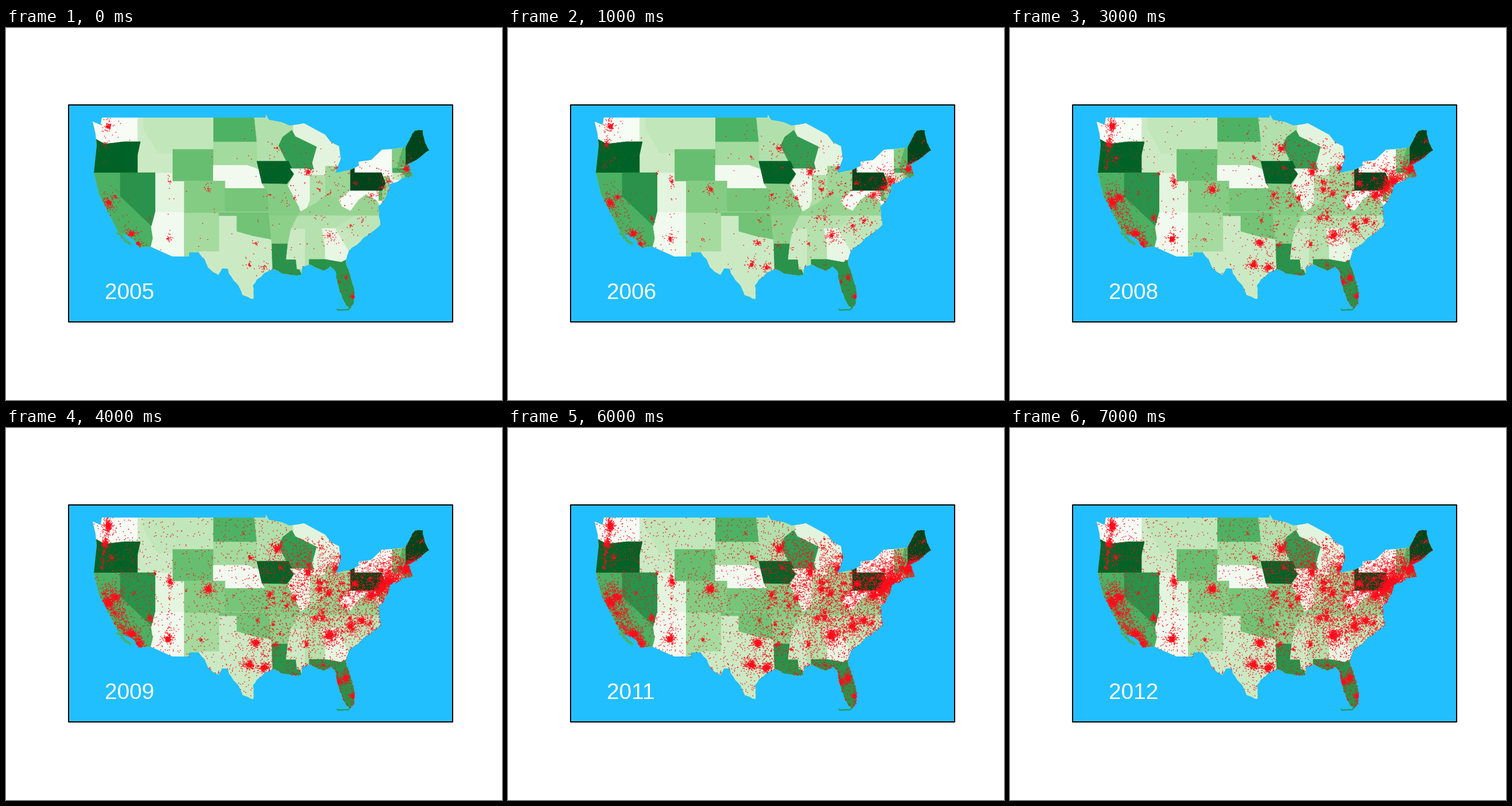
Write a matplotlib script that moves like this. It is 864x648 px and loops after 8000 ms.

```python
import numpy as np
import matplotlib.pyplot as plt
from matplotlib.animation import FuncAnimation
from matplotlib.patches import Polygon, Rectangle
from matplotlib.path import Path

W, H, DPI = 864, 648, 72
SEA, RED = "#22bffe", "#fc0d1b"
YEARS = range(2005, 2013)

rng = np.random.default_rng(11)
fig = plt.figure(figsize=(W / DPI, H / DPI), dpi=DPI, facecolor="white")
ax = fig.add_axes([0, 0, 1, 1])
ax.set_xlim(0, W)
ax.set_ylim(H, 0)
ax.axis("off")
ax.add_patch(Rectangle((109, 134), 669, 378, fc=SEA, ec="black", lw=2,
                       joinstyle="round", zorder=0))

# Key points of the coast and borders, clockwise from the northwest
NORTH = [(151, 163), (165, 169), (167, 156), (452, 156), (453, 151), (458, 160),
         (480, 164), (494, 170), (509, 168), (519, 166), (556, 186), (566, 199),
         (580, 206), (583, 228), (573, 253), (600, 247), (615, 240), (614, 233),
         (636, 230), (655, 212), (672, 211), (696, 208)]
ATLANTIC = [(696, 208), (704, 192), (712, 179), (726, 178), (730, 200), (737, 213),
            (720, 226), (700, 237), (708, 258), (697, 260), (688, 263), (668, 272),
            (667, 282), (657, 302), (648, 312), (652, 343), (622, 366), (597, 388),
            (592, 404), (602, 440), (607, 460), (606, 480), (600, 488)]
GULF = [(593, 484), (581, 458), (577, 440), (574, 424), (565, 415), (553, 423),
        (530, 412), (516, 416), (514, 430), (497, 430), (466, 420), (437, 438),
        (430, 449), (431, 472), (412, 465), (401, 444), (387, 420), (376, 419),
        (370, 430), (352, 417), (336, 391)]
PACIFIC = [(319, 391), (319, 398), (290, 398), (252, 381), (231, 382), (220, 366),
           (195, 355), (180, 325), (162, 290), (153, 252), (158, 205), (156, 184)]


def rough(pts, depth=2, amount=.05):
    """Break a coast into ragged pieces by random midpoint shifts."""
    pts = np.array(pts, float)
    for _ in range(depth):
        step = np.diff(pts, axis=0)
        normal = step[:, ::-1] * (1, -1)
        mid = pts[:-1] + step / 2 + normal * rng.normal(0, amount, (len(step), 1))
        pts = np.insert(pts, np.arange(1, len(pts)), mid, axis=0)
    return pts


nation = np.concatenate([NORTH, rough(ATLANTIC), rough(GULF), PACIFIC])
land = Path(nation)
mask = ax.add_patch(Polygon(nation, fc=plt.cm.Greens(.35), lw=0, zorder=1))


def state(shade, *xy):
    """Fill a rectangle (two corners) or polygon, trimmed to the nation."""
    if len(xy) == 4:
        x0, y0, x1, y1 = xy
        xy = x0, y0, x1, y0, x1, y1, x0, y1
    color = plt.cm.Greens(shade)
    patch = ax.add_patch(Polygon(np.reshape(xy, (-1, 2)), fc=color, ec=color,
                                 lw=.6, zorder=1))
    patch.set_clip_path(mask)


# Later states cover the overlap of earlier ones.
# West
state(.00, 145, 150, 229, 205)
state(.235, 229, 150, 290, 252)
state(.91, 140, 193, 157, 194, 172, 202, 206, 198, 234, 198, 229, 221, 229, 252, 140, 252)
state(.27, 239, 150, 361, 150, 361, 211, 290, 211, 289, 217, 264, 218, 254, 200, 240, 176)
state(.60, 140, 252, 256, 390)
state(.72, 199, 252, 260, 252, 260, 333, 256, 347, 199, 293)
state(.13, 260, 252, 310, 321)
state(.04, 260, 321, 310, 321, 310, 400, 290, 400, 252, 382, 256, 366, 253, 347, 257, 333)
state(.53, 290, 211, 361, 266)
state(.36, 310, 321, 371, 400)

# Plains
state(.59, 361, 150, 437, 198)
state(.37, 361, 198, 440, 248)
state(.035, 361, 239, 420, 239, 440, 246, 450, 279, 361, 279)
state(.455, 310, 266, 381, 321)
state(.495, 381, 279, 458, 321)
state(.235, 371, 320, 470, 320, 470, 480, 336, 480, 336, 389, 371, 389)
state(.505, 371, 321, 462, 321, 462, 368, 430, 362, 402, 354, 402, 327, 371, 327)

# Midwest
state(.32, 431, 140, 437, 198, 438, 232, 494, 232, 520, 160, 500, 140)
state(.135, 500, 160, 590, 257)
state(.68, 475, 205, 482, 190, 498, 178, 504, 189, 541, 207, 533, 235, 536, 246, 495, 245)
state(.91, 437, 232, 492, 232, 502, 254, 489, 272, 446, 271)
state(.33, 527, 256, 556, 308)
state(.39, 556, 240, 600, 300)
state(.09, 495, 245, 524, 245, 529, 258, 529, 300, 522, 318, 514, 320, 489, 280, 502, 254)
state(.455, 446, 271, 489, 272, 510, 312, 514, 327, 505, 334, 458, 327, 456, 285)

# South
state(.43, 458, 327, 508, 327, 508, 334, 491, 376, 463, 376)
state(.72, 463, 376, 491, 376, 488, 403, 505, 403, 507, 413, 520, 440, 465, 440)
state(.235, 497, 348, 522, 348, 520, 420, 507, 420, 505, 403, 488, 403, 491, 376)
state(.315, 521, 348, 556, 420)
state(.105, 550, 348, 575, 348, 600, 386, 592, 410, 556, 410, 556, 380)
state(.72, 528, 403, 556, 403, 584, 408, 592, 404, 620, 404, 620, 500, 528, 500)
state(.41, 513, 320, 540, 305, 556, 291, 580, 297, 592, 316, 580, 327, 508, 327)
state(.00, 612, 283, 658, 310)
state(.56, 649, 283, 658, 300)
state(.405, 572, 327, 592, 316, 614, 299, 624, 288, 645, 300, 652, 312, 655, 327)
state(.315, 508, 327, 608, 327, 578, 348, 497, 350)
state(.28, 608, 327, 660, 327, 660, 345, 622, 368, 600, 355, 573, 348)
state(.255, 573, 348, 600, 354, 624, 367, 598, 390)
state(.01, 580, 300, 600, 283, 634, 284, 614, 299, 600, 318, 586, 311)

# Northeast
state(.005, 600, 205, 690, 275)
state(.415, 655, 258, 668, 300)
state(1.0, 600, 240, 607, 240, 607, 252, 654, 252, 661, 271, 655, 283, 600, 283)
state(.26, 673, 252, 688, 264)
state(.43, 688, 252, 698, 265)
state(.62, 673, 243, 715, 236, 715, 270, 697, 270, 694, 252, 673, 252)
state(.46, 672, 205, 692, 243)
state(.58, 692, 205, 697, 205, 699, 239, 682, 243)
state(1.0, 696, 170, 745, 237)

# Offshore islands
for ends, width, shade in [([(195, 358), (216, 376)], 4, .60),
                           ([(577, 490), (600, 487)], 2, .72)]:
    ax.plot(*rough(ends, 4, .15).T, color=plt.cm.Greens(shade), lw=width, zorder=1)

# Cities from largest to smallest; the first group starts early.
EARLY = [(178, 304), (697, 245), (218, 358), (178, 171), (526, 250), (230, 375),
         (604, 467)]
LATER = [(667, 267), (655, 278), (636, 291), (563, 361), (424, 412), (435, 374),
         (352, 280), (450, 417), (282, 367), (592, 435), (472, 209), (574, 244),
         (190, 294), (599, 344), (619, 335), (172, 202), (561, 288), (545, 281),
         (580, 442), (502, 296), (459, 290), (607, 271), (538, 331), (285, 267),
         (250, 331)]

# Share of all dots present in each year
CITY_GROWTH = np.array([0, .13, .32, .48, .78, .93, .97, 1])
RURAL_GROWTH = np.array([.012, .04, .10, .18, .66, .93, .97, 1])

dots, births = [], []


def add(p, growth):
    p = p[land.contains_points(p)]
    dots.append(p)
    births.append(np.searchsorted(growth, rng.random(len(p))))


def city(center, n, start):
    reach = rng.exponential(1, (n, 1)) + .3
    offset = rng.normal(0, 1.7 + n / 260, (n, 2)) * reach
    add(center + offset, start + (1 - start) * CITY_GROWTH)


def corridor(n, width, path):
    """Scatter dots along a polyline."""
    p = np.array(path)
    t = rng.random(n) * (len(p) - 1)
    k = np.arange(len(p))
    line = np.column_stack([np.interp(t, k, axis) for axis in p.T])
    add(line + rng.normal(0, width, (n, 2)), .03 + .97 * CITY_GROWTH)


def countryside(n=110000):
    """Random points thinned by a smooth density, away from the lakes."""
    p = rng.uniform((150, 154), (740, 490), (n, 2))
    x, y = p.T
    level = .017
    for cx, cy, sx, sy, peak in [(580, 308, 66, 55, .13), (674, 260, 26, 22, .32),
                                 (190, 312, 16, 36, .05), (435, 395, 28, 32, .03),
                                 (525, 235, 48, 28, .08)]:
        level = level + peak * np.exp(-((x - cx) / sx) ** 2 / 2 - ((y - cy) / sy) ** 2 / 2)
    lake = ((x - 537) / 6) ** 2 + ((y - 228) / 23) ** 2 < 1
    lake |= (x > 500) & (x < 560) & (y < 190)
    p = p[(rng.random(n) < level / .55) & ~lake]
    add(p, RURAL_GROWTH)
    return p


for i, spot in enumerate(EARLY):
    city(spot, int(520 * .86 ** i), .28)
for i, spot in enumerate(LATER):
    city(spot, int(500 * .945 ** i), .06)
for spot in rng.choice(countryside(), 150):
    city(spot, int(8 + rng.exponential(16)), .03)

corridor(420, 4, [LATER[2], LATER[1], LATER[0], (680, 256), EARLY[1], (712, 226)])
corridor(350, 3, ATLANTIC[5:])
corridor(200, 3, GULF[:10])
corridor(330, 4, np.array(PACIFIC[4:9]) + (7, -4))
corridor(220, 5, [(178, 270), (196, 305), (212, 345)])
corridor(190, 2, [(176, 156), EARLY[3], LATER[15], (167, 248)])
corridor(90, 2, [(284, 254), (286, 275), (283, 366)])
corridor(130, 4, [LATER[3], LATER[13], LATER[14]])

dots = np.concatenate(dots)
births = np.concatenate(births)

marks, = ax.plot([], [], "s", color=RED, ms=1.5, mew=0, zorder=2)
label = ax.text(172.4, 472, "", color="white", fontsize=38.8, zorder=3,
                family="Liberation Sans", ha="left", va="baseline")


def draw(k):
    shown = dots[births <= k]
    marks.set_data(shown[:, 0], shown[:, 1])
    label.set_text(str(YEARS[k]))
    return marks, label


anim = FuncAnimation(fig, draw, frames=len(YEARS), interval=1000, repeat=True)
plt.show()
```
